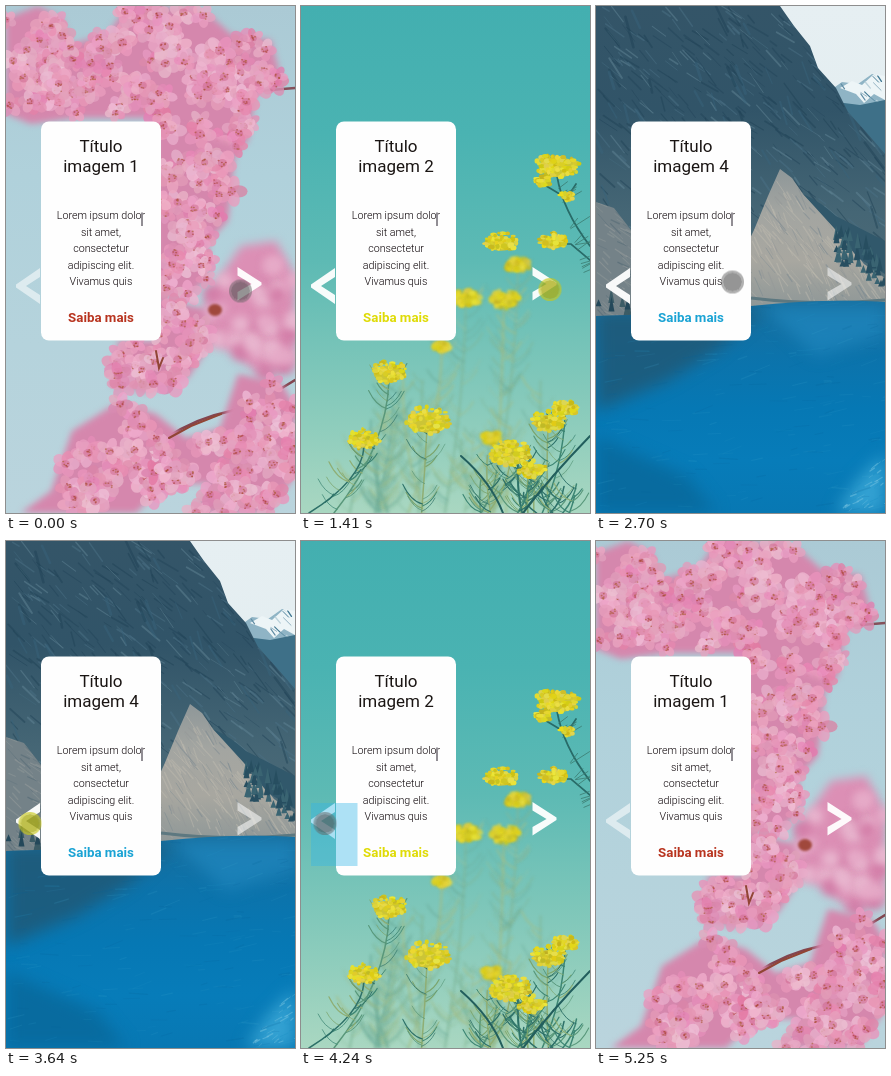
An HTML page with a canvas that plays this animation: 289 px wide and 507 px high, repeating every 5.71 s.

```html
<!DOCTYPE html>
<html lang="pt">
<head>
<meta charset="utf-8">
<title>Slides</title>
<style>
@property --slide { syntax: '<number>'; inherits: true; initial-value: 1; }
@property --tap { syntax: '<number>'; inherits: true; initial-value: 0; }
html, body { margin: 0; width: 100%; height: 100%; overflow: hidden; background: #fff; }
body { animation: slide 5710ms step-end infinite, tap 5710ms step-end infinite; }
canvas, svg { position: absolute; left: 0; top: 0; width: 289px; height: 507px; }
text { font-family: Roboto, Arial, sans-serif; text-anchor: middle; }
.title { font-size: 17px; fill: #1a1513; }
.body { font-size: 10.7px; font-weight: 300; fill: #0c0408; }
.link { font-size: 13.3px; font-weight: 700; }
/* 1 for the current slide, 0 or less for the others */
.s1, .s2, .s3, .s4 { opacity: calc(1 - (var(--slide) - var(--n)) * (var(--slide) - var(--n))); }
.s1 { --n: 1; }
.s2 { --n: 2; }
.s3 { --n: 3; }
.s4 { --n: 4; }
.prev { opacity: calc(.55 + .4 * min(1, var(--slide) - 1)); }
.next { opacity: calc(.55 + .4 * min(1, 4 - var(--slide))); }
.tapL { opacity: calc(-1 * var(--tap)); }
.tapR { opacity: var(--tap); }
.cursor {
  position: absolute; left: -12px; top: -12px; width: 19px; height: 19px;
  border: 2px solid; border-radius: 50%; background-clip: padding-box;
  animation: move 5710ms step-end infinite, press 5710ms step-end infinite;
}
@keyframes slide {
  0%, 84.76%, 100% { --slide: 1 }
  12.25%, 74.25% { --slide: 2 }
  25.91%, 66.02% { --slide: 3 }
  37.82% { --slide: 4 }
}
/* positive: right arrow, negative: left arrow */
@keyframes tap {
  0%, 16.63%, 29.42%, 41.33%, 69.7%, 77.75%, 88.26%, 100% { --tap: 0 }
  12.25%, 25.91%, 37.82% { --tap: 1 }
  14.5%, 28.2%, 40.1% { --tap: .5 }
  66.02%, 74.25%, 84.76% { --tap: -1 }
  68.3%, 76.53%, 87.04% { --tap: -.5 }
}
@keyframes move {
  0% { transform: translate(235px, 285.5px) }
  1.22% { transform: translate(249.5px, 284px) }
  43.6% { transform: translate(249px, 283px); animation-timing-function: steps(3) }
  47.28% { transform: translate(137px, 276.5px) }
  49.91% { transform: translate(137px, 276.5px); animation-timing-function: steps(5) }
  56.39% { transform: translate(49px, 288px) }
  58.66% { transform: translate(49px, 288px); animation-timing-function: steps(3) }
  62.34% { transform: translate(24.5px, 283px) }
  88.26% { transform: translate(24.5px, 283px); animation-timing-function: steps(3) }
  91.93%, 100% { transform: translate(-20px, 284px) }
}
@keyframes press {
  0%, 12.25%, 25.91%, 37.82%, 66.02%, 74.25%, 84.76%, 100% { background-color: rgba(85,85,85,.62); border-color: rgba(100,100,100,.5) }
  10.68%, 24.69%, 35.55%, 63.74%, 73%, 83.53% { background-color: rgba(172,172,18,.75); border-color: rgba(200,200,25,.65) }
}
</style>
</head>
<body>
<canvas class="s1" width="289" height="507"></canvas>
<canvas class="s2" width="289" height="507"></canvas>
<canvas class="s3" width="289" height="507"></canvas>
<canvas class="s4" width="289" height="507"></canvas>
<svg viewBox="0 0 289 507">
  <rect x="35" y="115.5" width="120" height="219" rx="8" fill="#fefefe"/>
  <g class="title">
    <text x="95" y="146">Título</text>
    <text class="s1" x="95" y="166">imagem 1</text>
    <text class="s2" x="95" y="166">imagem 2</text>
    <text class="s3" x="95" y="166">imagem 3</text>
    <text class="s4" x="95" y="166">imagem 4</text>
  </g>
  <g class="body">
    <text x="95" y="213">Lorem ipsum dolor</text>
    <text x="95" y="229.7">sit amet,</text>
    <text x="95" y="246">consectetur</text>
    <text x="95" y="262.7">adipiscing elit.</text>
    <text x="95" y="279">Vivamus quis</text>
  </g>
  <g class="link">
    <text class="s1" x="95" y="316" fill="#b8341f">Saiba mais</text>
    <text class="s2" x="95" y="316" fill="#dfdb06">Saiba mais</text>
    <text class="s3" x="95" y="316" fill="#b44a36">Saiba mais</text>
    <text class="s4" x="95" y="316" fill="#1aa3d4">Saiba mais</text>
  </g>
  <path d="M136 206.500V220" stroke="#918e94" stroke-width="2"/>
  <path class="prev" fill="#fff" d="M34 262V271L20 280L34 289V298L10 281.500V278.500Z"/>
  <path class="next" fill="#fff" d="M231.500 261V269.500L245.500 278L231.500 286V294.500L255.500 279V276.500Z"/>
  <rect class="tapL" x="10" y="262" width="46.500" height="63" fill="#33b5e5" fill-opacity=".4"/>
  <rect class="tapR" x="231" y="262" width="46.500" height="63" fill="#33b5e5" fill-opacity=".4"/>
</svg>
<div class="cursor"></div>
<script>
const W = 289, H = 507;
const pens = [...document.querySelectorAll('canvas')].map(c => c.getContext('2d'));
let seed = 7, g;
const rnd = () => (seed = seed * 16807 % 2147483647) / 2147483647;
const span = (a, b) => a + (b - a) * rnd();
const hsl = (h, s, l, a = 1) => `hsla(${h},${s}%,${l}%,${a})`;
const pick = list => list[Math.floor(rnd() * list.length)];
const times = (n, fn) => { for (let i = 0; i < n; i++) fn(i); };

function fade(stops, y0 = 0, y1 = H) {
  const f = g.createLinearGradient(0, y0, 0, y1);
  stops.forEach((c, i) => f.addColorStop(i / (stops.length - 1), c));
  return f;
}
function sky(...stops) {
  g.fillStyle = fade(stops);
  g.fillRect(0, 0, W, H);
}
function oval(x, y, rx, ry, fill, turn = 0) {
  g.fillStyle = fill;
  g.beginPath();
  g.ellipse(x, y, rx, ry, turn, 0, 7);
  g.fill();
}
function line(d, color, width = 1) {
  g.strokeStyle = color;
  g.lineWidth = width;
  g.lineCap = 'round';
  g.stroke(new Path2D(d));
}
function shape(d, fill) {
  const p = new Path2D(d);
  g.fillStyle = fill;
  g.fill(p);
  return p;
}
function blurred(px, fn) {
  g.filter = `blur(${px}px)`;
  fn();
  g.filter = 'none';
}
// Calls fn at n random points inside a path
function scatter(path, n, fn) {
  while (n) {
    const x = span(0, W), y = span(0, H);
    if (g.isPointInPath(path, x, y)) fn(x, y, n--);
  }
}
// Short random strokes inside a path
function grain(path, n, len, angle, colors, width = 1) {
  g.save();
  g.clip(path);
  scatter(path, n, (x, y) => {
    const a = angle + span(-.25, .25), l = span(.3, 1) * len;
    line(`M${x} ${y}l${l * Math.cos(a)} ${l * Math.sin(a)}`, pick(colors), span(.5, 1.5) * width);
  });
  g.restore();
}

function flower(x, y, r) {
  const turn = span(0, 6), squash = span(.36, .5), tone = span(-6, 3);
  times(5, i => {
    const a = turn + i * 1.257;
    oval(x + Math.cos(a) * r * .55, y + Math.sin(a) * r * .5, r * .58, r * squash,
      hsl(span(329, 338), span(50, 68), tone + span(73, 83), .8), a);
  });
  oval(x, y, r * .34, r * .3, hsl(338, 50, 60, .5));
  times(6, () => oval(x + span(-.3, .3) * r, y + span(-.3, .3) * r, 1, .8, hsl(span(0, 25), 50, 45, .65)));
}
function cluster(d, n) {
  let path;
  blurred(3, () => path = shape(d, '#d587ad'));
  scatter(path, n, (x, y) => flower(x, y, span(9, 15)));
}

function blossoms() {
  sky('#abcad5', '#b0d1db', '#b5d3dc', '#bad4dd');
  blurred(5, () => {
    const far = shape('M200 290L235 240L270 235L289 270V360L255 370L225 345L195 335Z', '#dc8fb5');
    scatter(far, 34, (x, y) => oval(x, y, 9, 8, pick(['#e6abc8', '#d27ba6', '#e9b8d0'])));
  });
  blurred(1, () => oval(209, 304, 7, 6, '#a0483c'));
  line('M289 374Q262 392 225 405Q190 412 160 432', '#82454f', 2.5);
  line('M240 86L289 82M221 507V485', '#85505a', 2.5);
  cluster('M0 12L32 0L56 12L66 38L102 28L118 4L155 0L205 10L225 28L265 34L276 75L250 88L242 135L215 160L180 150L150 112L70 112L25 118L0 108Z', 125);
  cluster('M150 112L230 140L222 215L203 235L203 270L185 290H150Z', 45);
  cluster('M150 290L198 303L205 338L182 372L140 387L106 380L112 335H152Z', 32);
  cluster('M232 368L276 378L289 400V470L262 507H185L205 478L160 478L130 507H15L45 485L66 425L112 396L150 408L180 432L214 422Z', 95);
  line('M150 345L153 362L157 352M163 432L185 420L215 408', '#914535', 2);
}

const greens = ['#3c8573', '#58977a', '#2d7068', '#7ba46b', '#8fae74'];
function bloom(x, y, r) {
  oval(x, y + r * .1, r * .85, r * .45, '#ccc536');
  times(r * 4, () => {
    const a = span(0, 6.3), d = Math.sqrt(rnd()) * r;
    oval(x + Math.cos(a) * d, y + Math.sin(a) * d * .6, span(1.5, 3.5), span(1.2, 2.8),
      hsl(span(53, 59), span(66, 84), span(44, 60)));
  });
}
// A stalk from (x, y) to the ground with paired twigs
function stalk(x, y, lean, colors) {
  line(`M${x} ${y}Q${x - 2} ${(y + H) / 2} ${x + lean} ${H}`, pick(colors), 1.5);
  times((H - y) / 6, i => {
    const k = rnd(), side = i % 2 ? 1 : -1, len = span(8, 20);
    line(`M${x + lean * k * k} ${y + (H - y) * k}q${side * len * .6} -3 ${side * len} ${-len}`, pick(colors), span(.6, 1.3));
  });
}

function meadow() {
  sky('#43afb0', '#4ab3b2', '#5dbab4', '#82c8ba', '#a9d7c1');
  const heads = [[88, 366, 18], [63, 433, 16], [126, 414, 23], [209, 447, 22], [231, 463, 14], [247, 415, 17],
    [264, 402, 13], [200, 236, 16], [252, 235, 14], [257, 159, 22], [242, 175, 8], [266, 190, 7]];
  const hazy = [[165, 292, 15], [203, 293, 15], [141, 341, 8], [217, 258, 13], [190, 432, 10]];
  blurred(1.8, () => {
    const pale = ['#7fb79a', '#93c3a4', '#6aab99', '#a3bd84'];
    hazy.forEach(([x, y]) => stalk(x, y, span(-35, 10), pale));
    times(16, () => stalk(span(50, W), span(370, 450), span(-25, 25), pale));
    hazy.forEach(h => bloom(...h));
  });
  const low = heads.filter(h => h[1] > 300);
  low.forEach(([x, y]) => stalk(x, y + 8, x < 100 ? -55 : span(-25, 10), greens));
  times(14, () => stalk(span(165, W), span(445, 490), span(-20, 20), greens));
  line('M256 170Q262 205 289 240M264 195L275 178M262 190L242 178M252 238L270 238L289 254', '#286b68', 1.7);
  times(16, () => {
    const y = span(180, 275);
    line(`M${257 + (y - 180) * .3} ${y}l${span(5, 20)} ${-span(3, 12)}`, '#3b7c70', .8);
  });
  line('M160 450Q190 476 202 507M289 430Q250 470 222 507', '#225e5d', 2);
  blurred(.5, () => heads.forEach(h => bloom(...h)));
}

function ridge(top, fill, rough) {
  let d = `M0 ${H}`;
  for (let x = 0; x <= W + 2; x += 3) d += `L${x} ${top(x) + span(-rough, rough)}`;
  return shape(d + `V${H}Z`, fill);
}
function tree(x, y, r, color) {
  line(`M${x} ${y}v${r * 2.6}`, color, 1.5);
  times(22, () => oval(x + span(-r, r), y + span(-.55, .55) * r, span(1.2, 3), span(1, 2.2), color));
}
function forest(top, color, fill, n) {
  ridge(top, fill, 2.5);
  times(n, i => {
    const x = (i + rnd()) * W / n;
    tree(x, top(x) + 2, span(6, 13), color);
  });
}

function sunset() {
  sky('#fedb7c', '#fcd478', '#f9c473', '#f3b06e', '#eda06c');
  blurred(9, () => times(7, i =>
    line(`M0 ${20 + i * 25}Q150 ${span(0, 60) + i * 22} 289 ${i * 24}`, i % 2 ? '#ffe08b66' : '#f4bd6b55', 12)));
  ridge(x => 186 - 11 * Math.cos((x - 235) / 38), fade(['#e8a067', '#df8367', '#d07065', '#b95e66'], 170, 430), 1);
  ridge(x => 238 + 78 * Math.sin(x / 160), fade(['#dd8662', '#cf6c62', '#b55b67', '#9b5067'], 235, 440), .6);
  blurred(5, () => times(13, i =>
    line(`M${span(20, 320)} ${span(100, 220)}l-70 ${span(110, 190)}`, i % 2 ? '#ffc88820' : '#c56a581c', span(5, 12))));
  ridge(x => 368 + 16 * Math.sin(x / 55 - 1.5), '#b0586780', 1);
  tree(175, 379, 12, '#8e4a66');
  tree(276, 379, 10, '#8e4a66');
  forest(x => 399 + 7 * Math.sin(x / 22 - 1.5), '#8e4a66', fade(['#8e4a66', '#864666', '#713c61'], 385, 490), 9);
  forest(x => 452 - 23 * Math.cos((x - 40) / 46), '#713b5f', fade(['#713b5f', '#68375d', '#6c3a60'], 425, 507), 7);
}

function pines(n, x0, x1, shore, colors) {
  times(n, () => {
    const x = span(x0, x1), h = span(6, 16);
    shape(`M${x} ${shore(x) - h}l3 ${h}h-6Z`, pick(colors));
  });
}

function lake() {
  sky('#e6eff2', '#e1ecef', '#dbe8ec');
  const far = shape('M232 86L246 76L262 78L276 68L289 71V190H232Z', '#8fb4c5');
  shape('M244 82L256 75L266 79L278 68L289 70V94L278 88L268 97L260 88Z', '#edf5f7');
  grain(far, 90, 14, .8, ['#618da4', '#bdd3dc', '#447a94']);
  shape('M240 96L264 99L289 94V300H220Z', '#3e7088');
  const rock = shape('M0 0H184L198 20L214 40L222 62L240 82L252 106L270 126L289 148V310H0Z',
    fade(['#345568', '#315468', '#456675', '#526d78'], 0, 310));
  grain(rock, 550, 24, .75, ['#24465b88', '#49708488', '#1f405577', '#5f829288'], 1.3);
  grain(rock, 90, 34, 1.1, ['#1f405577', '#38637b77'], 2);
  const left = shape('M0 196L18 202L35 224L80 238L150 270V312H0Z', '#748288');
  grain(left, 140, 18, .6, ['#8f989888', '#53697588', '#a2a6a266']);
  const scree = shape('M184 163L196 172L207 188L228 208L248 232L268 258L289 272V302H140V262L158 224L172 190Z',
    fade(['#8d9698', '#a3a5a1', '#a8a7a0', '#8e9797'], 160, 302));
  grain(scree, 190, 24, 1, ['#bcb8ad88', '#7c8a9088', '#94999888', '#c4bfb266']);
  shape('M207 188Q225 196 240 210L289 235V268L262 252L238 222Z', '#31586b');
  pines(55, 240, W, x => span(225, 258) + (x - 240) * .55, ['#274e60', '#3a6472']);
  pines(36, 0, 160, () => span(296, 312), ['#24485a', '#3c5c66']);
  line('M155 292Q220 300 289 294', '#5d7880', 3);
  const water = shape('M0 310Q80 308 155 300T289 296V507H0Z',
    fade(['#176f9f', '#0c73ab', '#0678b4', '#077cb9', '#0878b3'], 298, 507));
  g.save();
  g.clip(water);
  blurred(8, () => {
    shape('M0 305H165L120 345L70 375L0 405Z', '#23556fbb');
    shape('M165 300H289V330L220 350Z', '#2189c1aa');
    shape('M289 448L262 474L240 507H289Z', '#33a1d2');
    shape('M0 430L90 470L120 507H0Z', '#086b9f');
  });
  g.restore();
  grain(water, 170, 20, -.15, ['#2590c030', '#0a5f9630', '#43a5cc28']);
  grain(new Path2D('M289 450L262 474L242 507H289Z'), 35, 9, -.5, ['#7ac5e077', '#1d8fc577']);
}

[blossoms, meadow, sunset, lake].forEach((paint, i) => {
  g = pens[i];
  paint();
});
</script>
</body>
</html>
```
